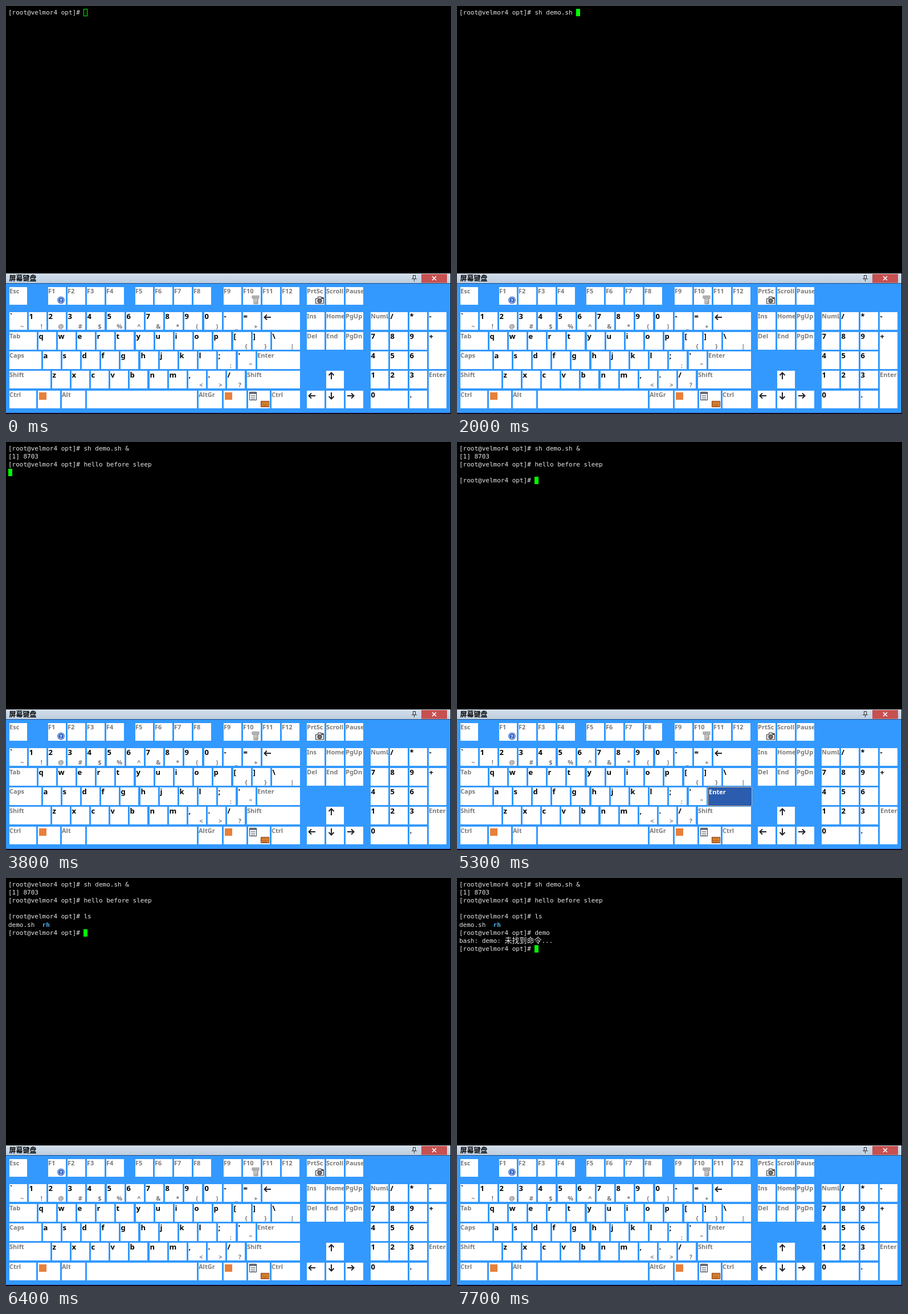
Write an HTML page that moves like this. It is 781x717 px and loops after 8000 ms.

```html
<!DOCTYPE html>
<html lang="zh">
<head>
<meta charset="utf-8">
<title>Terminal and on-screen keyboard</title>
<style>
  html, body { margin: 0; width: 100%; height: 100%; overflow: hidden; background: #000; }
  svg { display: block; }
  text { white-space: pre; }
  .term { font: 11px "DejaVu Sans Mono", "Noto Sans CJK SC", "Noto Sans CJK", monospace; fill: #e6e6e6; }
  .term .dir { font-weight: bold; fill: #47b4ee; }
  .term .cjk { font-size: 13px; }
  .title { font: bold 12px "Noto Sans CJK SC", "Noto Sans CJK", sans-serif; }
  .name, .sub { font: bold 11px "Noto Sans", "Open Sans", sans-serif; fill: #7b7b7b; }
  .char { font: bold 13px "Noto Sans", "Open Sans", sans-serif; fill: #000; }
  .sub { text-anchor: middle; }
  .down text { fill: #fff; }
</style>
</head>
<body>
<svg width="781" height="717" viewBox="0 0 781 717">
  <defs>
    <linearGradient id="bar" x2="0" y2="1">
      <stop stop-color="#d3deea"/><stop offset="1" stop-color="#bccddf"/>
    </linearGradient>
    <path id="arrow" d="M6 0H-5M-1-4.5L-5.5 0L-1 4.5" fill="none" stroke="#20202c" stroke-width="2"/>
    <g id="help">
      <circle r="6.5" fill="#2f62c4"/><circle r="5" fill="none" stroke="#cfe0ff"/>
      <text y="3.5" text-anchor="middle" style="font:bold 9px 'Noto Sans',sans-serif;fill:#fff">?</text>
    </g>
    <g id="calc">
      <path d="M-6-7H6V-3H-6ZM-3-3H4V7H-3Z" fill="#ddd" stroke="#777"/>
      <path d="M-4-5H4M-1 0H3M-1 3H3M-1 5H3" stroke="#555" stroke-dasharray="1.5 1"/>
    </g>
    <g id="camera">
      <path d="M-7-3H-3V-6H3V-3H7V6H-7Z" fill="#e4e4e4" stroke="#333"/>
      <circle cy="1" r="3.5" fill="#777" stroke="#222"/><path d="M4-4H7" stroke="#111" stroke-width="2"/>
    </g>
    <rect id="badge" x="-6.5" y="-6.5" width="13" height="13" fill="#e8803a"/>
    <g id="menu">
      <path d="M-6-7H6V7H-6Z" fill="#fff" stroke="#333a4c"/>
      <path d="M-6-5H6" stroke="#333a4c" stroke-width="2"/>
      <path d="M-4-1H4M-4 2H4M-4 5H4" stroke="#556"/>
    </g>
    <g id="board">
      <path d="M-7-5H7V5H-7Z" fill="#f2a43c" stroke="#7a2c10"/>
      <path d="M-6-2.5H6M-6 .5H6M-5 3H5" stroke="#8a2a10" stroke-width="1.5" stroke-dasharray="2 1"/>
    </g>
  </defs>
  <rect width="781" height="717"/>
  <g id="screen" class="term"></g>
  <rect y="470" width="780" height="18" fill="url(#bar)"/>
  <rect y="488" width="780" height="227" fill="#39f"/>
  <path d="M0 487.5H780" stroke="#1f4a86"/>
  <path d="M0 715.5H781" stroke="#20184a"/>
  <text class="title" x="5.5" y="483">屏幕键盘</text>
  <path d="M714 473.5H719M714.5 473V479M718.5 473V479M712 479.5H721M716.5 480V484" stroke="#333" fill="none"/>
  <rect x="729" y="471" width="45" height="15.5" fill="#c75050"/>
  <path d="M748 475L755 482M755 475L748 482" stroke="#fff" stroke-width="1.6"/>
  <g id="keys"></g>
</svg>
<script>
const LOOP = 8000, PITCH = 34.2, CELL = 6.62;
const PROMPT = '[root@velmor4 opt]# ';

// time, typed or printed text, keys held down
const STEPS = [
  [0, PROMPT], [300],
  [800, 's', 's'], [900], [1100, 'h'], [1200, '', 'h'], [1300, ' ', 'Space'], [1400, 'd'],
  [1600, 'em', 'm'], [1700, 'o', 'o'], [1800], [2000, '.sh '],
  [2900, '', 'Shift'], [3100, '&', 'Shift', '7'], [3200],
  [3700, '\n[1] 8703\n' + PROMPT, 'Enter'], [3800, 'hello before sleep\n'],
  [5300, '\n' + PROMPT, 'Enter'], [5400],
  [6000, 'l', 'l'], [6100, 's', 's'], [6200],
  [6300, '\ndemo.sh  rh\n' + PROMPT, 'Enter'], [6400],
  [6900, 'd', 'd'], [7000, 'e', 'e'], [7100], [7200, 'm', 'm'], [7300, 'o', 'o'], [7400],
  [7600, '\nbash: demo: 未找到命令...\n' + PROMPT, 'Enter'], [7700]
];

const ROWS = [494, 538, 573, 607, 641, 676];
const keys = [];
const add = (row, x, label, more) =>
  keys.push({ id: label, x: Math.floor(x), y: ROWS[row], w: 31, h: 31, label, ...more });
const run = (row, x, labels, more) =>
  labels.split(' ').forEach((s, i) => add(row, x + PITCH * i, s, more));
// each pair is a character with its shifted one
const chars = (row, x, pairs) => pairs.split(' ').forEach((p, i) =>
  add(row, x + PITCH * i, p[0], { char: true, sub: p[1], up: p[1] || p.toUpperCase() }));
const pad = (row, labels, shifted) => labels.split(' ').forEach((s, i) =>
  add(row, 640 + PITCH * i, s, { id: 'pad' + s, char: true, up: shifted && shifted.split(' ')[i] }));

add(0, 6, 'Esc');
run(0, 74, 'F1 F2 F3 F4');
run(0, 227, 'F5 F6 F7 F8');
run(0, 382, 'F9 F10 F11 F12');
run(0, 528, 'PrtSc Scroll Pause');
chars(1, 6, '`~ 1! 2@ 3# 4$ 5% 6^ 7& 8* 9( 0) -_ =+');
add(1, 450, '←', { w: 66 });
add(2, 6, 'Tab', { w: 48 });
chars(2, 57, 'q w e r t y u i o p [{ ]}');
add(2, 467, '\\', { char: true, sub: '|', up: '|', w: 49 });
add(3, 6, 'Caps', { w: 56 });
chars(3, 65, 'a s d f g h j k l ;: \'"');
add(3, 441, 'Enter', { w: 75 });
add(4, 6, 'Shift', { w: 72 });
chars(4, 81, 'z x c v b n m ,< .> /?');
add(4, 423, 'Shift', { id: 'RightShift', w: 93 });
add(5, 6, 'Ctrl', { w: 47 });
add(5, 56, '', { w: 39, icon: 'badge' });
add(5, 98, 'Alt', { w: 41 });
add(5, 142, '', { id: 'Space', w: 193 });
add(5, 338, 'AltGr', { w: 41 });
add(5, 382, '', { w: 40, icon: 'badge' });
add(5, 425, '', { w: 38, icon: 'menu' });
add(5, 466, 'Ctrl', { w: 50 });
run(1, 528, 'Ins Home PgUp');
run(2, 528, 'Del End PgDn');
add(4, 562, '↑');
run(5, 528, '← ↓ →');
add(1, 640, 'NumLock');
['/', '*', '-'].forEach((s, i) => add(1, 674 + PITCH * i, s, { id: 'pad' + s, char: true }));
pad(2, '7 8 9', 'Home ↑ PgUp');
add(2, 742, '+', { id: 'pad+', char: true, h: 65 });
pad(3, '4 5 6', '← _ →');
pad(4, '1 2 3', 'End ↓ PgDn');
add(4, 742, 'Enter', { id: 'padEnter', h: 66 });
add(5, 640, '0', { id: 'pad0', char: true, up: 'Ins', w: 65 });
add(5, 708, '.', { id: 'pad.', char: true, up: 'Del' });

const ANGLES = { '←': 0, '↑': 90, '→': 180, '↓': 270 };
const esc = s => s.replace(/&/g, '&amp;').replace(/</g, '&lt;');
const use = (id, x, y, turn = 0) => `<use href="#${id}" transform="translate(${x} ${y}) rotate(${turn})"/>`;

function drawLabel(text, isChar, dx, dy) {
  if (text in ANGLES) return use('arrow', 9 + dx, 9 + dy, ANGLES[text]);
  return isChar
    ? `<text class="char" x="${dx + .5}" y="${12 + dy}">${esc(text)}</text>`
    : `<text class="name" x="${dx}" y="${11 + dy}">${text}</text>`;
}

function drawKey(k, held) {
  const shift = held.includes('Shift'), down = held.includes(k.id);
  const isPad = k.id.startsWith('pad');
  let label = shift && k.up ? k.up : k.label;
  if (isPad && label === '_') label = '';
  const sub = k.sub && shift ? k.label : k.sub;
  const isChar = k.char && !(isPad && shift && k.up);
  const grow = down ? 1 : 0;
  const w = k.w + 3 * grow, h = k.h + 3 * grow;
  const dx = down ? 2 : k.id === 'padEnter' && held.includes('Enter') ? 1 : 0;
  const face = down
    ? `<rect x=".5" y=".5" width="${w - 1}" height="${h - 1}" fill="#2b5cad" stroke="#d3a878"/>`
    : `<rect width="${w}" height="${h}" fill="#fff"/>`;
  return `<svg x="${k.x - grow}" y="${k.y - grow}" width="${w}" height="${h}" class="${down ? 'down' : ''}">` +
    face + drawLabel(label, isChar, dx, 2 * grow) +
    (sub ? `<text class="sub" x="${k.w * .72 + dx}" y="${29 + 2 * grow}">${esc(sub)}</text>` : '') +
    (k.icon ? use(k.icon, 8.5, 9.5) : '') + '</svg>';
}

const SHORTCUTS = use('help', 96.5, 517) + use('calc', 438, 516.5) +
  use('camera', 550.5, 517) + use('board', 454.5, 699.5);

function drawScreen(text, hollow) {
  const lines = text.split('\n');
  const top = i => Math.floor(5 + 14.2 * i);
  const last = lines.length - 1;
  const x = Math.floor(4 + lines[last].length * CELL);
  const rows = lines.map((line, i) => {
    const rich = esc(line)
      .replace(/ rh$/, ' <tspan class="dir">rh</tspan>')
      .replace(/[\u4e00-\u9fff]+/, '<tspan class="cjk">$&</tspan>');
    return `<text x="4" y="${top(i) + 10}">${rich}</text>`;
  });
  const cursor = hollow
    ? `<rect x="${x + .5}" y="${top(last) + .5}" width="6" height="12" fill="none" stroke="#0f0"/>`
    : `<rect x="${x}" y="${top(last)}" width="7" height="13" fill="#0f0"/>`;
  return rows.join('') + cursor;
}

const screenLayer = document.getElementById('screen');
const keyLayer = document.getElementById('keys');
let shown = -1;

function show(n) {
  const text = STEPS.slice(0, n + 1).map(s => s[1] || '').join('');
  const held = STEPS[n].slice(2);
  screenLayer.innerHTML = drawScreen(text, n === 0);
  keyLayer.innerHTML = keys.map(k => drawKey(k, held)).join('') +
    (held.includes('Shift') ? '' : SHORTCUTS);
}

function tick() {
  const t = performance.now() % LOOP;
  const n = STEPS.filter(s => s[0] <= t).length - 1;
  if (n !== shown) show(shown = n);
  requestAnimationFrame(tick);
}
tick();
</script>
</body>
</html>
```
